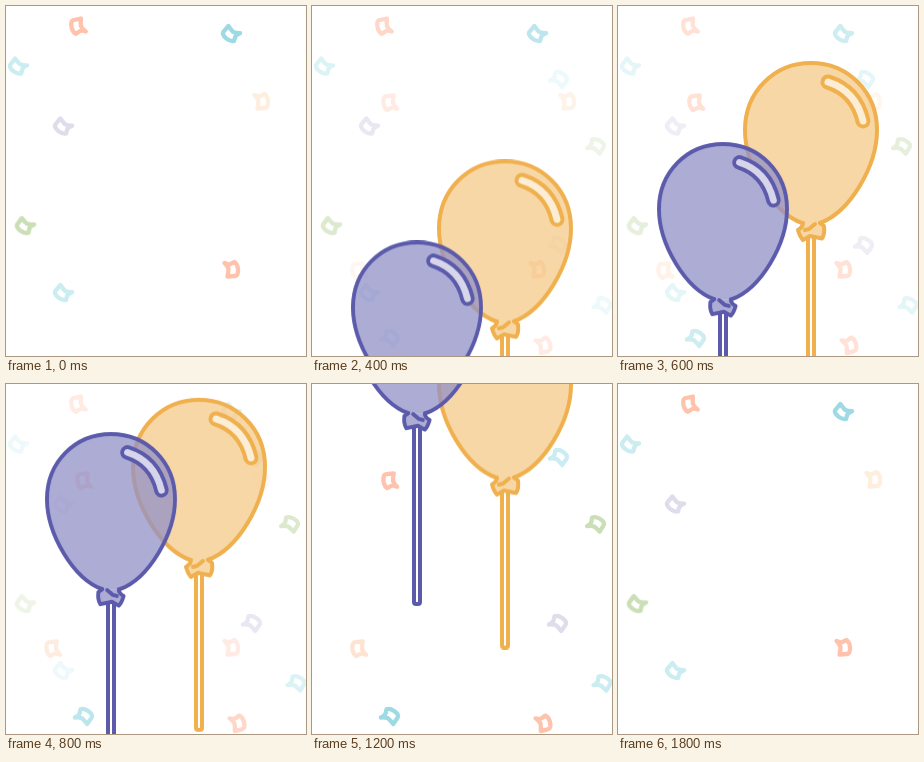
These frames come from a looping animation (300 by 350 pixels, 1.9 s). An HTML page:

```html
<!DOCTYPE html>
<html lang="en">
<head>
<meta charset="utf-8">
<title>Balloons</title>
<style>
  html, body { margin: 0; width: 100%; height: 100%; overflow: hidden; background: #fff; }
  svg { display: block; width: 100vw; height: 100vh; }

  .confetti { fill: none; stroke-width: 4.3; stroke-linejoin: round; filter: blur(.4px); }
  .coral { stroke: #ffc3ad; }
  .teal { stroke: #9ddae3; }
  .aqua { stroke: #cbedf2; }
  .cream { stroke: #fdeedd; }
  .peach { stroke: #fde4d2; }
  .lilac { stroke: #dfddec; }
  .green { stroke: #cbdfb7; }

  .balloon { stroke: currentColor; stroke-width: 4; stroke-linejoin: round; stroke-linecap: round; fill: none; }
  .skin { fill: var(--skin); fill-opacity: .75; }
  .rim { stroke-width: 15; }
  .shine { stroke: var(--shine); stroke-width: 7; }
  .yellow { color: #f0b04e; --skin: #f4ca88; --shine: #fcedd5; }
  .purple { color: #5b5aab; --skin: #9290c7; --shine: #d6d5ea; }

  /* three 600 ms phases, six steps each, then a 100 ms rest */
  .confetti, .balloon { animation: 1.9s steps(6) infinite; }
  .fade-out { animation-name: fade-out; }
  .fade-in { animation-name: fade-in; }
  .yellow { animation-name: rise-yellow; }
  .purple { animation-name: rise-purple; }

  @keyframes fade-out {
    0%, 94.7368%, 100% { opacity: 1; }
    31.5789% { opacity: .5; }
    63.1579% { opacity: 0; }
  }
  @keyframes fade-in {
    0%, 94.7368%, 100% { opacity: 0; }
    31.5789% { opacity: .5; }
    63.1579% { opacity: 1; }
  }
  @keyframes rise-yellow {
    0% { transform: translate(193px, 352px); }
    31.5789% { transform: translate(193px, 57px); }
    63.1579% { transform: translate(193px, -66.5px); }
    94.7368%, 100% { transform: translate(193px, -361.5px); }
  }
  @keyframes rise-purple {
    0% { transform: translate(105px, 433px); }
    31.5789% { transform: translate(105px, 138px); }
    63.1579% { transform: translate(105px, -126px); }
    94.7368%, 100% { transform: translate(105px, -421px); }
  }
</style>
</head>
<body>
<svg viewBox="0 0 300 350">
  <defs>
    <path id="bit" d="M-7-6Q-3-4-1-5L3-7Q6-5 6.500 0Q7 7 3 7L-4 7.500Q-3 3-3 0Q-4-3-7-6Z"/>
    <path id="body" d="M9 160C39 149 66 103 66 67C66 29 37 0 0 0S-66 29-66 67C-66 103-39 149-9 160"/>
    <g id="knot">
      <path class="skin" d="M-8 160Q-8 164-13 167Q-11 174-8 177L-1 173L11 175.500Q14 171 13 163L9 160"/>
      <path d="M-6 167L-2 166L4 161"/>
    </g>
    <path id="arc" d="M17 19Q45 28 52 58"/>
  </defs>

  <g class="confetti fade-out">
    <use href="#bit" class="coral" transform="translate(72 20.500) rotate(172)"/>
    <use href="#bit" class="teal" transform="translate(225 28) rotate(134)"/>
    <use href="#bit" class="aqua" transform="translate(12 60.500) rotate(132)"/>
    <use href="#bit" class="cream" transform="translate(255.500 95)"/>
    <use href="#bit" class="lilac" transform="translate(57 120.500) rotate(134)"/>
    <use href="#bit" class="green" transform="translate(19 220) rotate(130)"/>
    <use href="#bit" class="coral" transform="translate(225.500 263)"/>
    <use href="#bit" class="aqua" transform="translate(57 287) rotate(134)"/>
  </g>
  <g class="confetti fade-in">
    <use href="#bit" class="coral" transform="translate(78 97) rotate(178)"/>
    <use href="#bit" class="aqua" transform="translate(247 73) rotate(-50)"/>
    <use href="#bit" class="green" transform="translate(284 140) rotate(-54)"/>
    <use href="#bit" class="lilac" transform="translate(246 239) rotate(-50)"/>
    <use href="#bit" class="peach" transform="translate(47 265) rotate(178)"/>
    <use href="#bit" class="aqua" transform="translate(290.500 299) rotate(-54)"/>
    <use href="#bit" class="teal" transform="translate(78 332) rotate(-50)"/>
    <use href="#bit" class="coral" transform="translate(231.500 339) rotate(-10)"/>
  </g>

  <g class="balloon yellow">
    <path d="M-3 175V328Q-3 330-1 330H1Q3 330 3 328V175"/>
    <use href="#body" class="skin"/>
    <use href="#knot"/>
    <use href="#arc" class="rim"/>
    <use href="#arc" class="shine"/>
  </g>
  <g class="balloon purple">
    <path d="M-3 170V344Q-3 346-1 346H1Q3 346 3 344V170"/>
    <g transform="scale(.97)">
      <use href="#body" class="skin"/>
      <use href="#knot" transform="scale(-1 1)"/>
      <use href="#arc" class="rim"/>
      <use href="#arc" class="shine"/>
    </g>
  </g>
</svg>
</body>
</html>
```
